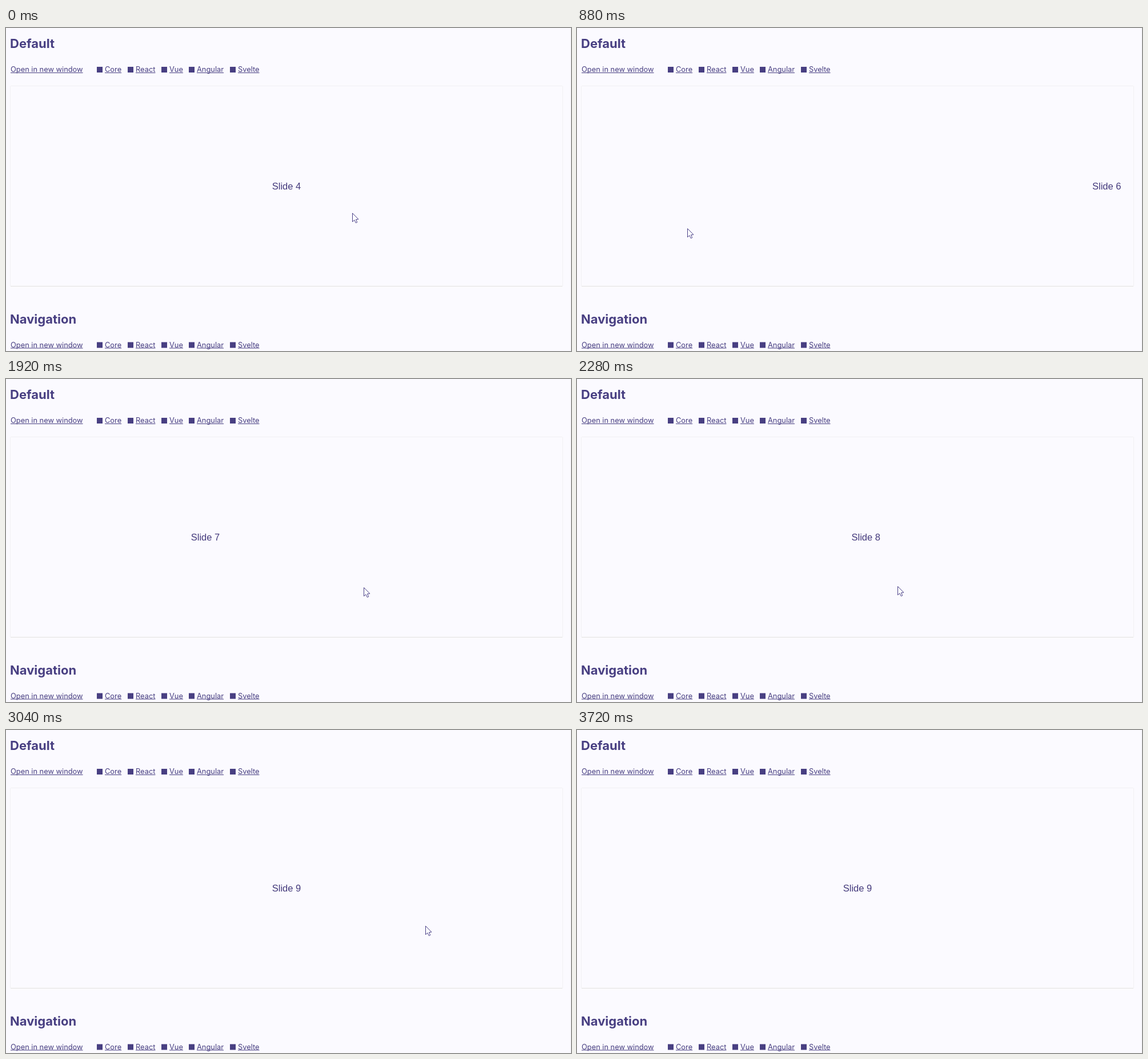
An HTML page with a canvas that plays this animation: 989x566 px, repeating every 3.8 s.

```html
<!DOCTYPE html>
<html lang="en">
<head>
<meta charset="utf-8">
<title>Slider</title>
<style>
  html, body { margin: 0; width: 100%; height: 100%; overflow: hidden; background: #fbfaff; }
  canvas { display: block; }
</style>
</head>
<body>
<canvas id="stage" width="989" height="566"></canvas>
<script>
const ctx = document.getElementById('stage').getContext('2d');
const LOOP = 3800, STEP = 40, SETTLE = 300;
const BG = '#fbfaff', INK = '#483f82';
const panel = { x: 8, y: 102, w: 966, h: 350 };
const FIRST = 4, LAST = 9;
const links = [['Core', 158], ['React', 212], ['Vue', 271], ['Angular', 319], ['Svelte', 391]];

// Swipes: press time, release time, press point, release point
const swipes = [
  { t0: 60, t1: 300, from: [606, 324], to: [150, 342] },
  { t0: 660, t1: 900, from: [723, 346], to: [184, 351] },
  { t0: 1240, t1: 1480, from: [736, 348], to: [96, 353] },
  { t0: 1840, t1: 2080, from: [768, 364], to: [200, 368] },
  { t0: 2440, t1: 2660, from: [815, 360], to: [131, 367] },
  { t0: 3080, t1: 3320, from: [748, 342], to: [326, 340] }
];
const exit = { t: 3680, point: [1000, 120] };

const clamp = u => Math.min(1, Math.max(0, u));
const easeInOut = u => (1 - Math.cos(Math.PI * clamp(u))) / 2;
const easeOut = u => 1 - (1 - clamp(u)) ** 3;
const mix = (a, b, u) => a + (b - a) * u;
const mixPoint = (a, b, u) => [mix(a[0], b[0], u), mix(a[1], b[1], u)];

function cursorAt(t) {
  if (t >= exit.t) return null;
  for (let i = 0; i < swipes.length; i++) {
    const s = swipes[i], next = swipes[i + 1];
    if (t <= s.t1) return mixPoint(s.from, s.to, easeInOut((t - s.t0) / (s.t1 - s.t0)));
    const arrive = next ? next.t0 : exit.t;
    if (t < arrive) {
      const target = next ? next.from : exit.point;
      return mixPoint(s.to, target, easeInOut((t - s.t1) / (arrive - s.t1)));
    }
  }
  return null;
}

// Distance scrolled, in pixels; dragging past the last slide meets resistance
function scrollAt(t) {
  let i = swipes.length - 1;
  while (i > 0 && t < swipes[i].t0) i--;
  const s = swipes[i], start = i * panel.w;
  const pull = s.from[0] - cursorAt(Math.min(t, s.t1))[0];
  const atEnd = FIRST + i === LAST;
  const dragged = start + (atEnd ? pull ** 0.85 : pull);
  if (t <= s.t1) return dragged;
  const rest = atEnd ? start : start + panel.w;
  return mix(dragged, rest, easeOut((t - s.t1) / SETTLE));
}

function label(text, x, y, font, color = INK) {
  ctx.font = font;
  ctx.fillStyle = color;
  ctx.fillText(text, x, y);
}

function link(text, x, y) {
  label(text, x, y, '12.83px Inter, sans-serif');
  ctx.fillRect(x, y + 1, ctx.measureText(text).width, 1);
}

function section(title, y) {
  label(title, 7, y + 35, '700 22px Inter, sans-serif');
  link('Open in new window', 8, y + 77);
  for (const [name, x] of links) {
    ctx.fillRect(x + 1, y + 68, 10, 10);
    link(name, x + 15, y + 77);
  }
}

function slides(scroll) {
  const { x, y, w, h } = panel;
  ctx.save();
  ctx.beginPath();
  ctx.rect(x, y, w, h);
  ctx.clip();
  ctx.fillStyle = '#fafaec';
  ctx.fillRect(x, y, w, h);
  ctx.textAlign = 'center';
  for (let n = FIRST; n <= LAST; n++) {
    const left = x + (n - FIRST) * w - scroll;
    if (left > x + w || left < x - w) continue;
    ctx.fillStyle = BG;
    ctx.fillRect(left, y, w + 0.5, h);
    label('Slide ' + n, left + w / 2, 283, '16.5px "Liberation Sans", Arial, sans-serif', '#443a7c');
  }
  ctx.restore();
}

function borders() {
  const { x, y, w, h } = panel;
  ctx.fillStyle = '#f1f0f3';
  ctx.fillRect(x, y - 1, w, 1);
  ctx.fillRect(x - 1, y, 1, h);
  ctx.fillRect(x + w, y, 1, h);
  ctx.fillStyle = '#e2e2de';
  ctx.fillRect(x, y + h, w, 1);
  ctx.fillStyle = '#f4f3f8';
  ctx.fillRect(988, 0, 1, 566);
}

function pointer([x, y]) {
  const shape = [[0, 0], [0, 15], [3.4, 12], [5.8, 17], [8.2, 16], [6, 11], [10.4, 10.6]];
  ctx.beginPath();
  for (const [dx, dy] of shape) ctx.lineTo(Math.round(x) + 0.5 + dx, Math.round(y) + 0.5 + dy);
  ctx.closePath();
  ctx.fillStyle = '#fdfdff';
  ctx.fill();
  ctx.strokeStyle = '#4a4088';
  ctx.lineWidth = 1;
  ctx.stroke();
}

function draw(t) {
  ctx.fillStyle = BG;
  ctx.fillRect(0, 0, 989, 566);
  section('Default', 0);
  section('Navigation', 482.5);
  slides(scrollAt(t));
  borders();
  const cursor = cursorAt(t);
  if (cursor) pointer(cursor);
}

const begin = performance.now();
function tick() {
  const t = (performance.now() - begin) % LOOP;
  draw(Math.floor(t / STEP) * STEP);
  requestAnimationFrame(tick);
}
tick();
</script>
</body>
</html>
```
